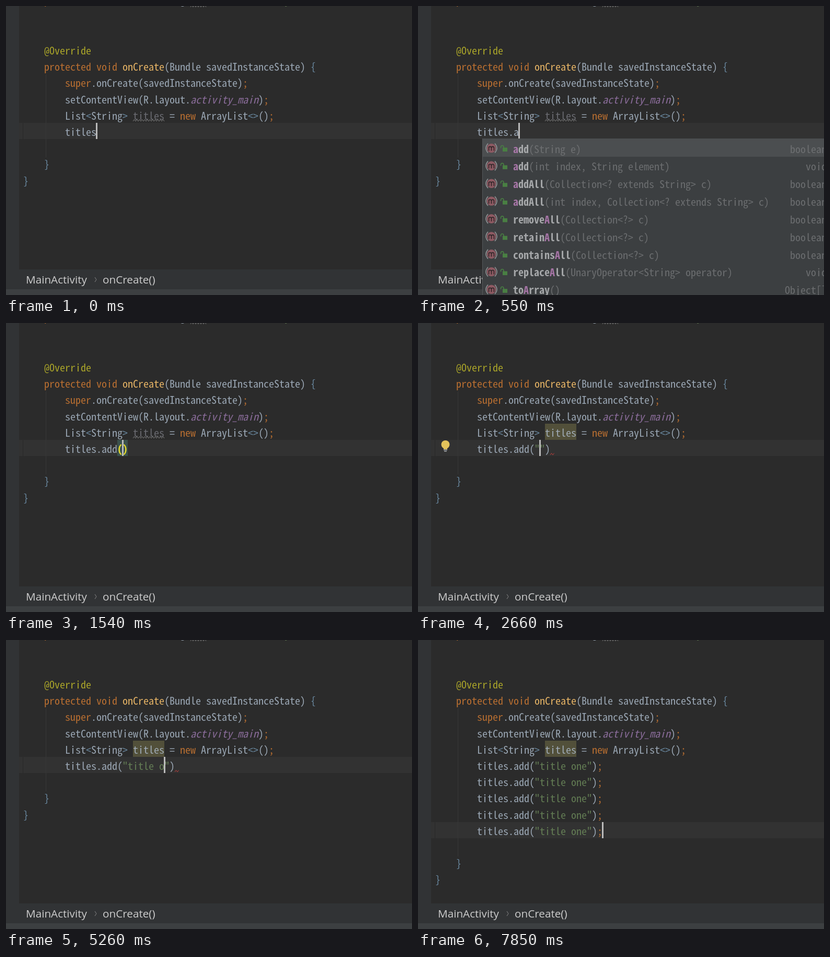
Recreate the animation shown at these times as an HTML page. Size 777x554 px, loop 8000 ms.

```html
<!DOCTYPE html>
<html lang="en">
<head>
<meta charset="utf-8">
<title>Code completion</title>
<style>
  html, body { margin: 0; width: 100%; height: 100%; overflow: hidden; background: #2b2b2b; }
  svg { display: block; width: 777px; height: 554px; }
  text { white-space: pre; fill: #a9b7c6; opacity: .88; }
  .annotation { fill: #bbb529; }
  .string { fill: #6a8759; }
  .keyword { fill: #cc7832; }
  .method { fill: #ffc66d; }
  .field { fill: #9876aa; font-style: italic; }
  .bracket { fill: #7295b0; }
  .pair { fill: #ffef28; font-weight: bold; }
  .unused .variable { fill: #72737a; }
  .name { fill: #b4b6b8; font-weight: bold; }
  .match { fill: #b57db5; }
  .plain { fill: #8f9092; }
  .dim { fill: #727476; }
  .crumb { font: 20.7px "Open Sans", sans-serif; fill: #cdcdcd; opacity: 1; }
</style>
</head>
<body>
<svg id="stage" viewBox="0 0 777 554"></svg>
<script>
const LOOP = 8000, CELL = 10, LEFT = 33, ROW = 31.2, CARET_TOP = 224, ITEM = 33.85;
const MONO = '"Noto Sans Mono CJK SC", "Noto Sans Mono CJK JP", "Liberation Mono", monospace';
const stage = document.getElementById('stage');

// Choose the font size that makes one character fill one cell.
const probe = document.createElement('canvas').getContext('2d');
probe.font = `100px ${MONO}`;
stage.style.font = `${CELL * 100 / probe.measureText('0').width}px ${MONO}`;

// "|" marks the caret in the line being typed.
const STEPS = [
  [0, 'titles|'], [310, 'titles.|'], [550, 'titles.a|'], [670, 'titles.ad|'],
  [830, 'titles.add|'], [1540, 'titles.add(|)'],
  ...[[1820, ''], [3620, 'q'], [3870, 'qj'], [4010, 'qj '], [4290, 'qj'], [4440, 'q'],
    [4590, ''], [4720, 't'], [4840, 'ti'], [4990, 'titl'], [5110, 'title'],
    [5260, 'title o'], [5410, 'title on'], [5560, 'title one']
  ].map(([time, word]) => [time, `titles.add("${word}|")`]),
  [6240, 'titles.add("title one");|']
];
const COPIES = [7300, 7450, 7700, 7850];

const ADDS = ['boolean add(String e)', 'void add(int index, String element)',
  'boolean addAll(Collection<? extends String> c)',
  'boolean addAll(int index, Collection<? extends String> c)'];
const MEMBERS = ['String toString()', 'void clear()', ADDS[2], ADDS[0], ADDS[1], ADDS[3],
  'int size()', 'boolean remove(Object o)', 'String remove(int index)'];
const A_MEMBERS = [...ADDS, 'boolean removeAll(Collection<?> c)', 'boolean retainAll(Collection<?> c)',
  'boolean containsAll(Collection<?> c)', 'void replaceAll(UnaryOperator<String> operator)',
  'Object[] toArray()'];

const CLASSES = ['annotation', 'string', 'keyword', 'method', 'field', 'variable', 'pair', 'bracket', ''];
const TOKENS = /(@\w+)|("[^"]*")|(\b(?:private|static|final|protected|void|super|new)\b|;)|((?<=void )onCreate)|(activity_main)|((?<=> )titles)|(\(\)$)|([<>{}])|(\w+|.)/g;

const escape = s => s.replace(/</g, '&lt;').replace(/>/g, '&gt;');
const span = (cls, s) => `<tspan class="${cls}">${escape(s)}</tspan>`;
const text = (x, y, body, cls = '') => `<text x="${x}" y="${y}" class="${cls}">${body}</text>`;
const rect = (x, y, w, h, fill) => `<rect x="${x}" y="${y}" width="${w}" height="${h}" fill="${fill}"/>`;
const path = (d, stroke, width = 1) => `<path d="${d}" fill="none" stroke="${stroke}" stroke-width="${width}"/>`;
const within = (t, from, to) => t >= from && t < to;

const highlight = line => line.replace(TOKENS, (token, ...groups) =>
  span(CLASSES[groups.findIndex(g => g !== undefined)], token));

// Row 0 is the line being typed.
function code(row, indent, line, cls) {
  return text(LEFT + indent * CELL, CARET_TOP + row * ROW + 25, highlight(line), cls);
}

function wave(x, y, width, color) {
  let d = `M${x} ${y + 2}`;
  for (let i = 1; i * 2.5 <= width; i++) d += `L${x + i * 2.5} ${y + (i % 2 ? -1.5 : 2)}`;
  return path(d, color);
}

function methodIcon(y, isAbstract) {
  const sides = path(`M134 ${y - 9}Q126 ${y} 134 ${y + 9}M147 ${y - 9}Q155 ${y} 147 ${y + 9}`, '#8d9092', 1.6);
  return `<circle cx="140.5" cy="${y}" r="${isAbstract ? 8.8 : 11}" fill="#8e5a63"/>` +
    (isAbstract ? sides : '') +
    path(`M135.5 ${y + 5}v-8m0 3q0-3 2.5-3t2.5 3v5m0-5q0-3 2.5-3t2.5 3v5`, '#35292c', 1.8) +
    rect(162, y - 1, 9, 7.5, '#497f43') +
    path(`M158.5 ${y}v-2q0-3 2.7-3t2.7 3v2`, '#497f43', 1.6);
}

function binaryIcon(y) {
  return `<path d="M133 ${y - 5}l7-7v7zM141.5 ${y - 12}h7.5v12h-16v-3.5h8.5z" fill="#7f8588"/>` +
    rect(129, y + 1, 24, 11, '#3d7186') +
    path(`M134.5 ${y + 3}h4v7h-4zM143 ${y + 4.5}l2.5-1.5v8`, '#22292d', 1.6);
}

function popup(items, prefix, loading) {
  const top = 254, height = items.length * ITEM + 2;
  let out = rect(123, top, 660, height, '#56595b') + rect(124, top, 660, height - 1, '#3c3f41') +
    rect(124, top, 660, 35, '#4b4e50');
  const hit = prefix && new RegExp(`^${prefix}|${prefix[0].toUpperCase()}`);
  items.forEach((item, i) => {
    const [, type, name, params] = item.match(/(\S+) (\w+)(.*)/);
    const inherited = name === 'toString';
    const y = top + 18.5 + i * ITEM, base = y + 9;
    const found = hit && name.match(hit);
    const start = found ? found.index : 0, end = found ? start + found[0].length : 0;
    const label = inherited ? span('plain', name)
      : span('name', name.slice(0, start)) + span('name match', name.slice(start, end)) + span('name', name.slice(end));
    out += (loading && i ? binaryIcon(y + .5) : methodIcon(y, !inherited)) +
      text(182, base, label + span('dim', params)) +
      text(782 - type.length * CELL, base, escape(type), 'dim');
  });
  return out;
}

function bulb() {
  return '<circle cx="52.5" cy="233" r="8" fill="#e3c35b"/>' +
    rect(49, 239, 7, 3, '#e3c35b') + rect(49, 242.5, 7, 1.5, '#a9adb0') + rect(50, 245, 5, 1.5, '#a9adb0');
}

function draw(t) {
  const typed = STEPS.filter(([time]) => time <= t).pop()[1];
  const line = typed.replace('|', '');
  const copies = COPIES.filter(time => time <= t).length;
  const top = CARET_TOP + Math.round(copies * ROW);
  const caretX = LEFT + (8 + typed.indexOf('|')) * CELL - 1;
  const idle = within(t, 3250, 3620) || within(t, 7050, 7300);
  const used = t >= 2260;

  let out = rect(0, 0, 777, 554, '#2b2b2b') + rect(0, 0, 25, 554, '#313335') +
    rect(25, top, 752, 31, '#323232') + rect(32, top, 1, 31, '#282828') +
    rect(76, 131, 1, 159 + copies * ROW, '#373737');

  if (t >= 1820) out += rect(243, 193, 60, 31, '#52503a');
  if (line.endsWith('()')) out += rect(213, top, 20, 31, '#3b514d');

  out += code(-8.1, 4, 'private static final String TAG = "MainActivity";') + wave(353, 0, 30, '#7d7d7d') +
    code(-5, 4, '@Override') +
    code(-4, 4, 'protected void onCreate(Bundle savedInstanceState) {') +
    code(-3, 8, 'super.onCreate(savedInstanceState);') +
    code(-2, 8, 'setContentView(R.layout.activity_main);') +
    code(-1, 8, 'List<String> titles = new ArrayList<>();', used ? '' : 'unused');
  if (!used) out += wave(243, 219, 60, '#7d7d7d');
  for (let i = 0; i <= copies; i++) out += code(i, 8, line);
  out += code(copies + 2, 4, '}') + code(copies + 3, 0, '}');

  if (within(t, 2260, 6520)) out += wave(LEFT + (8 + line.length) * CELL, 251, 9, '#bc3f3c');
  if (within(t, 2660, 3620) || within(t, 7050, 7300)) out += bulb();
  if (!idle) out += rect(caretX, top, 3, 31, '#bbb');

  out += rect(0, 505, 777, 38, '#313335') + rect(0, 543, 777, 11, '#3c3f41') +
    text(38, 532, 'MainActivity', 'crumb') + path('M170 520l3 4.5l-3 4.5', '#888') +
    text(185, 532, 'onCreate()', 'crumb');

  if (within(t, 310, 1540)) {
    const prefix = line.slice(7);
    out += popup(prefix.length > 1 ? ADDS : prefix ? A_MEMBERS : MEMBERS, prefix, t < 430);
  }
  return out;
}

let shown = '';
function tick() {
  const next = draw(performance.now() % LOOP);
  if (next !== shown) stage.innerHTML = shown = next;
  requestAnimationFrame(tick);
}
tick();
</script>
</body>
</html>
```
